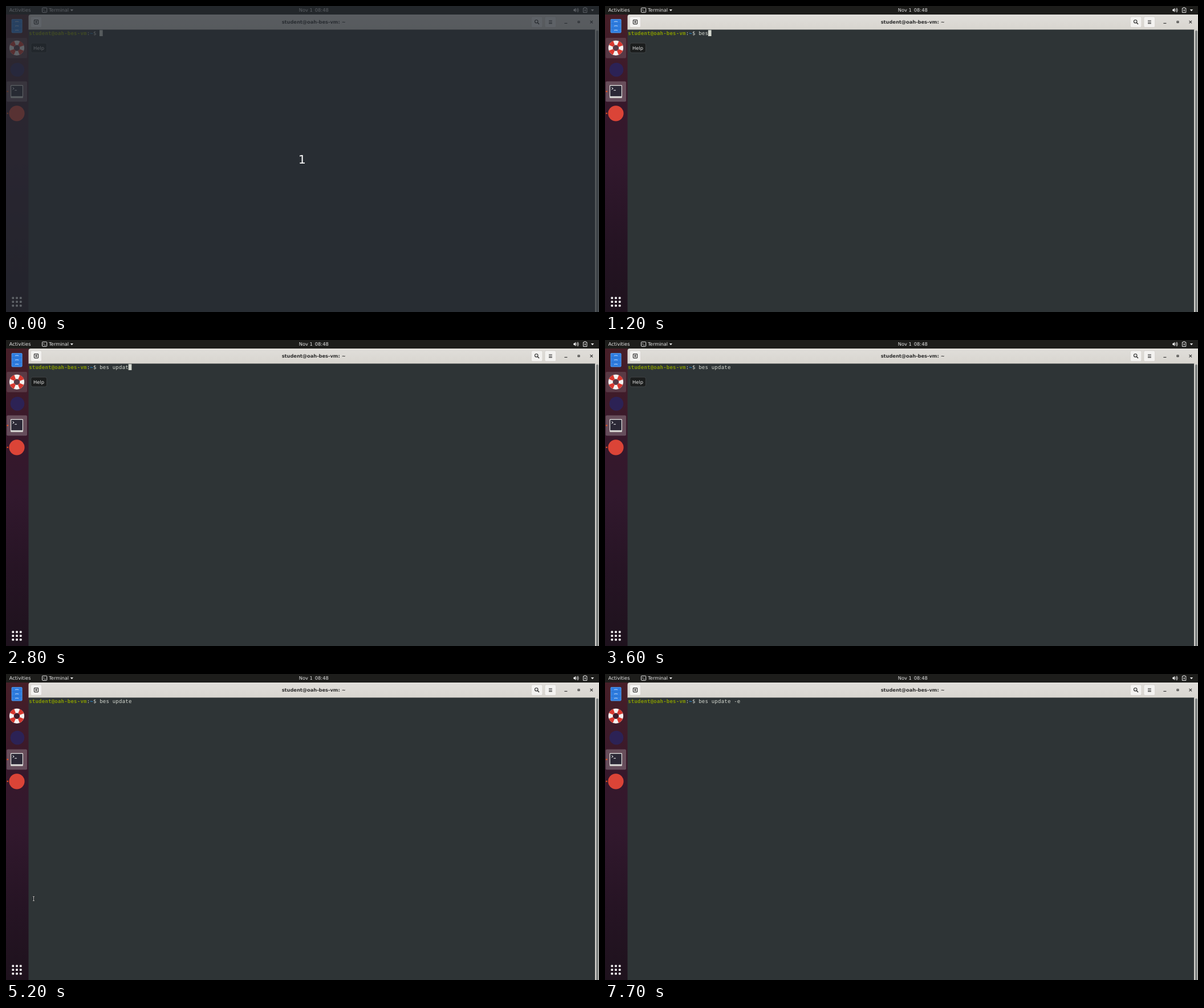
Animation of 1040 by 538 pixels, one loop 8 s. Source, as an HTML page:

```html
<!DOCTYPE html>
<html lang="en">
<head>
<meta charset="utf-8">
<title>Terminal session</title>
<style>
  html, body { margin: 0; width: 100%; height: 100%; overflow: hidden; background: #2e3436; }
  svg { display: block; width: 1040px; height: 538px; }
  text { text-rendering: geometricPrecision; white-space: pre; }
  .ui { font: 8.27px "DejaVu Sans", sans-serif; fill: #e8e8e8; }
  .mono { font: 9.02px "DejaVu Sans Mono", monospace; fill: #d3d7cf; }
  .bold { font-weight: bold; }
  .button { fill: #f3f2f0; stroke: #cfcac4; stroke-width: .6; }
  .glyph { fill: none; stroke: #2d2d2d; stroke-width: 1.1; }
</style>
</head>
<body>
<svg viewBox="0 0 1040 538" xmlns="http://www.w3.org/2000/svg">
  <defs>
    <linearGradient id="dockFill" x1="0" y1="0" x2="0" y2="1">
      <stop offset="0" stop-color="#471f28"/>
      <stop offset=".3" stop-color="#37182b"/>
      <stop offset=".5" stop-color="#31182d"/>
      <stop offset=".75" stop-color="#261424"/>
      <stop offset="1" stop-color="#1e121d"/>
    </linearGradient>
    <linearGradient id="headFill" x1="0" y1="0" x2="0" y2="1">
      <stop offset="0" stop-color="#e0deda"/>
      <stop offset="1" stop-color="#d8d5cf"/>
    </linearGradient>
  </defs>

  <!-- Top bar -->
  <rect width="1040" height="15" fill="#1d1d1b"/>
  <text class="ui" x="5.8" y="10.3">Activities</text>
  <rect x="63.5" y="3.3" width="8.2" height="8" rx="1" fill="none" stroke="#e8e8e8"/>
  <path d="M65.4 5.6l1.5 1.3-1.5 1.3M67.5 9h2" fill="none" stroke="#e8e8e8" stroke-width=".8"/>
  <text class="ui" x="75.2" y="10.3">Terminal</text>
  <path d="M112.8 6h5.2l-2.6 3.2zM1025.8 6h5.4l-2.7 3.2z" fill="#e8e8e8"/>
  <text class="ui" x="539.7" y="10.3" text-anchor="middle">Nov 1&#8194;08:48</text>
  <path d="M995.3 5.8h1.6l2.3-2.3v7.6l-2.3-2.3h-1.6z" fill="#e8e8e8"/>
  <path d="M1000.3 5.5q1.4 1.8 0 3.6M1001.6 4.3q2.4 3 0 6M1002.8 3.3q3 4 0 8" fill="none" stroke="#e8e8e8" stroke-width=".8"/>
  <path d="M1014.2 3.9v-1h2.8v1h1.8v7.5h-6.4V3.9z" fill="none" stroke="#e8e8e8" stroke-width="1"/>
  <path d="M1016.4 4.8l-2.2 3.2h1.3l-.6 2.4 2.3-3.2h-1.4z" fill="#e8e8e8"/>

  <!-- Dock -->
  <rect y="15" width="40" height="523" fill="url(#dockFill)"/>
  <rect id="hover" x="1.2" y="56" width="35.8" height="35.8" rx="2" fill="#fff"/>
  <rect x="1.2" y="132.4" width="35.8" height="35.8" rx="2" fill="#fff" opacity=".23"/>
  <g>
    <rect x="9.8" y="23" width="18.6" height="24.3" rx="1.5" fill="#2f7de0"/>
    <rect x="10.2" y="23.4" width="17.8" height="23.5" rx="1.2" fill="none" stroke="#5ba4f0" stroke-width=".8"/>
    <path d="M10.5 31h17.2M10.5 39h17.2" stroke="#2567c0" stroke-width=".7"/>
    <path d="M16.7 28.2v-1h4.8v1M16.7 35.8v-1h4.8v1M16.7 43.4v-1h4.8v1" fill="none" stroke="#dcebfc" stroke-width=".8"/>
  </g>
  <g fill="none" stroke-width="7.8">
    <circle cx="19" cy="73.8" r="9.2" stroke="#f4f2f0"/>
    <circle cx="19" cy="73.8" r="9.2" stroke="#d9382f" stroke-dasharray="7.226" stroke-dashoffset="-3.613"/>
  </g>
  <circle cx="20" cy="112" r="12.3" fill="#2c2255"/>
  <g>
    <rect x="8" y="139" width="22" height="23" rx="1.5" fill="#c9c6c4"/>
    <rect x="8.6" y="139.6" width="20.8" height="19.8" rx="1" fill="#2b2836" stroke="#efedeb" stroke-width="1.1"/>
    <path d="M11.6 143.2l2.6 1.9-2.6 1.9M15.3 148.2h3.6" fill="none" stroke="#fff" stroke-width="1"/>
  </g>
  <circle cx="19" cy="188.8" r="13.6" fill="#db4437"/>
  <circle cx="2.8" cy="150.3" r="1.3" fill="#e95420"/>
  <circle cx="2.8" cy="188.8" r="1.3" fill="#e95420"/>
  <g id="grid" fill="#f2f0f1"></g>

  <!-- Window -->
  <path d="M39.5 42V19q0-4 4-4H1040v27z" fill="url(#headFill)"/>
  <rect x="39.5" y="41.5" width="994" height="497" fill="#2e3436"/>
  <rect x="1033" y="41.5" width="7" height="497" fill="#d5d3ce"/>
  <rect x="1035" y="43" width="4" height="500" rx="2" fill="#7f8382"/>
  <rect class="button" x="43.3" y="18.8" width="19.3" height="18.8" rx="2.5"/>
  <rect class="button" x="921.3" y="18.8" width="19.6" height="18.8" rx="2.5"/>
  <rect class="button" x="945" y="18.8" width="19.6" height="18.8" rx="2.5"/>
  <g class="glyph">
    <rect x="49.4" y="24.6" width="7.2" height="7" rx=".8"/>
    <path d="M53 26.1v4M51 28.1h4"/>
    <circle cx="930.2" cy="27.2" r="2.7"/>
    <path d="M932.2 29.2l2.8 2.8" stroke-width="1.5"/>
    <path d="M952 25.8h5.8M952 28.2h5.8M952 30.6h5.8"/>
    <path d="M979.4 30.4h5"/>
    <rect x="1003.1" y="26.8" width="2.8" height="2.6"/>
    <path d="M1024.5 25.8l4.6 4.6M1029.1 25.8l-4.6 4.6"/>
  </g>
  <text class="ui bold" x="539.6" y="31.2" text-anchor="middle" style="fill:#2d2d2d">student@oah-bes-vm: ~</text>

  <g id="line"></g>
  <rect id="caret" y="42.3" width="5.64" height="10.7" fill="#d3d7cf"/>

  <g id="tip">
    <rect x="43.8" y="65.3" width="27.7" height="16.8" rx="3" fill="#1b1d1d" stroke="#484d4f" stroke-width=".7"/>
    <text class="ui" x="48.1" y="76.8">Help</text>
  </g>

  <g id="beam" fill="none">
    <path d="M-1.8-3.7h3.6M0-3.7v7.4M-1.8 3.7h3.6" stroke="#111" stroke-width="1.7"/>
    <path d="M-1.6-3.7h3.2M0-3.7v7.4M-1.6 3.7h3.2" stroke="#e8e8e8" stroke-width=".8"/>
  </g>
  <path id="arrow" d="M0 0v10l2.4-2.2 1.6 3.6 1.6-.7-1.6-3.5h3.2z" fill="#111" stroke="#fff" stroke-width=".7"/>

  <g id="countdown">
    <rect width="1040" height="538" fill="#262b33" opacity=".72"/>
    <text x="519.3" y="276.5" text-anchor="middle" font-size="20.5" font-family="DejaVu Sans, sans-serif" fill="#fff">1</text>
  </g>
</svg>
<script>
  const LOOP = 8000, LEFT = 40.2, CELL = 5.636, PROMPT = 22;
  const COMMAND = "bes update -e";
  const $ = id => document.getElementById(id);

  // [time, characters typed, caret visible]
  const typing = [
    [0, 0, 1], [900, 2, 1], [1200, 3, 1], [1300, 4, 1], [2000, 4, 0],
    [2200, 4, 1], [2300, 5, 1], [2400, 6, 1], [2600, 7, 1], [2700, 8, 1],
    [2800, 9, 1], [2900, 10, 1], [3100, 11, 1], [3600, 11, 0], [4300, 11, 1],
    [5000, 11, 0], [5500, 11, 1], [6100, 11, 0], [6700, 12, 1], [7100, 13, 1],
    [7700, 13, 0]
  ];
  // [time, pointer shape, x, y]
  const pointer = [
    [0, ""], [4300, "beam", 44.8, 355.8], [4400, "beam", 81.2, 338], [4600, "beam", 83.6, 336.2],
    [5000, "beam", 75, 350], [5100, "beam", 62, 373], [5200, "beam", 48.5, 395],
    [5500, "arrow", 33, 430], [5600, "arrow", 19, 472], [5700, "arrow", 6.5, 527], [5800, ""]
  ];
  // [time, hover tile opacity, tooltip opacity]
  const hints = [[0, .13, 1], [4300, .1, .3], [4400, 0, 0]];

  const at = (steps, t) => steps.findLast(s => s[0] <= t);
  const show = (id, on) => $(id).setAttribute("visibility", on ? "visible" : "hidden");

  function add(parent, tag, attrs) {
    const el = document.createElementNS("http://www.w3.org/2000/svg", tag);
    for (const k in attrs) el.setAttribute(k, attrs[k]);
    return parent.appendChild(el);
  }

  function write(str, col, color, bold) {
    const x = [...str].map((_, i) => (LEFT + (col + i) * CELL).toFixed(2)).join(" ");
    const el = add($("line"), "text", { x, y: 50.6, class: bold ? "mono bold" : "mono" });
    el.style.fill = color;
    el.textContent = str;
    return el;
  }

  for (let i = 0; i < 9; i++)
    add($("grid"), "rect", { x: 10.4 + i % 3 * 6.75, y: 511.5 + Math.floor(i / 3) * 6.75, width: 3.8, height: 3.8, rx: 1.2 });

  write("student@oah-bes-vm", 0, "#859900", true);
  write(":", 18, "#d3d7cf");
  write("~", 19, "#268bd2", true);
  write("$", 20, "#d3d7cf");
  const letters = [...COMMAND].map((c, i) => write(c, PROMPT + i, "#d3d7cf"));

  function draw(t) {
    const [, count, caretOn] = at(typing, t);
    letters.forEach((el, i) => el.setAttribute("visibility", i < count ? "visible" : "hidden"));
    $("caret").setAttribute("x", LEFT + (PROMPT + count) * CELL - .2);
    show("caret", caretOn);

    const [, hover, tip] = at(hints, t);
    $("hover").setAttribute("opacity", hover);
    $("tip").setAttribute("opacity", tip);

    const [, shape, x, y] = at(pointer, t);
    for (const id of ["beam", "arrow"]) show(id, id === shape);
    if (shape) $(shape).setAttribute("transform", `translate(${x} ${y})`);

    show("countdown", t < 100);
  }

  const start = performance.now();
  function tick() {
    draw((performance.now() - start) % LOOP);
    requestAnimationFrame(tick);
  }
  tick();
</script>
</body>
</html>
```
